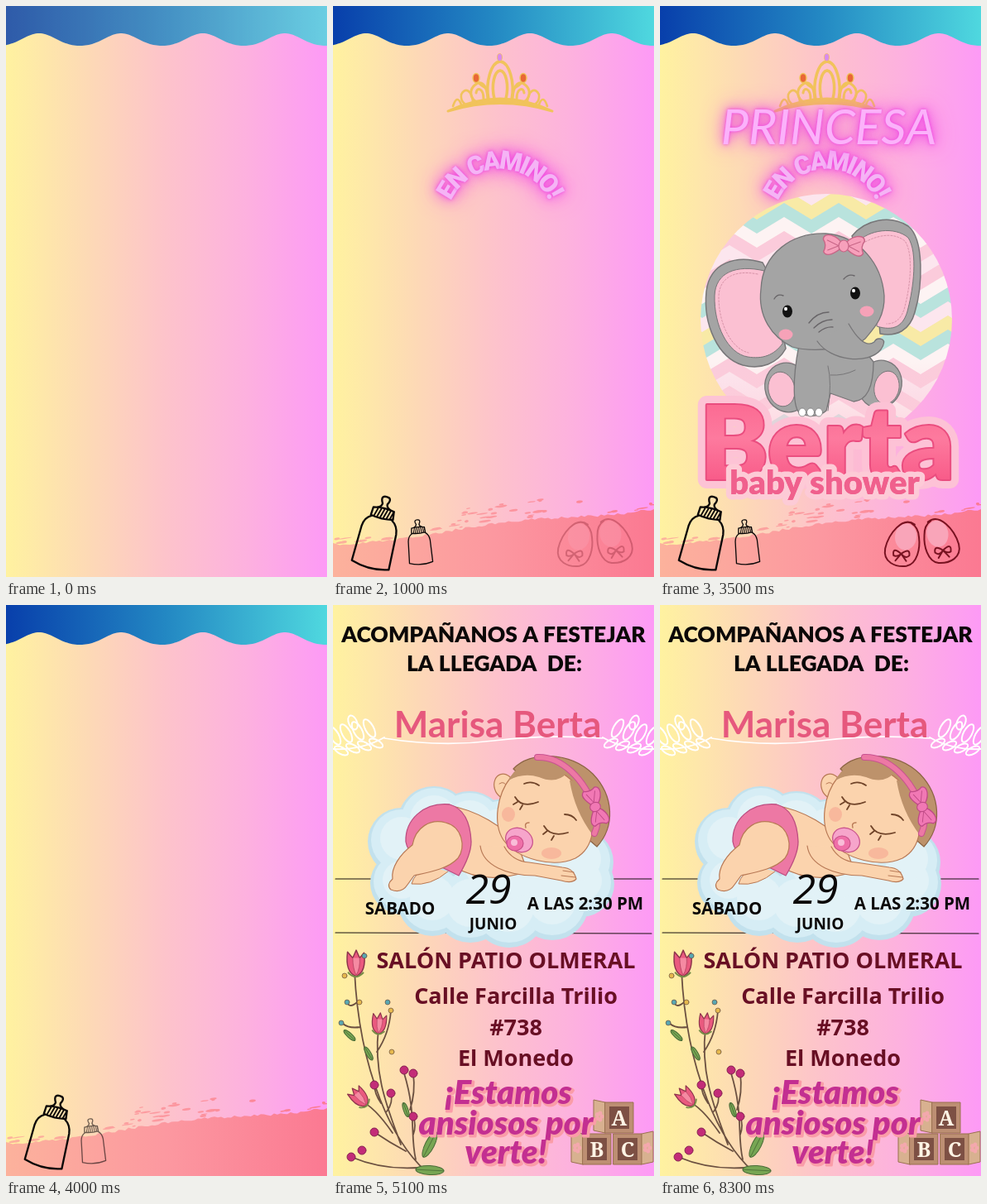
Recreate the animation shown at these times as an HTML page with a canvas. Size 388 by 690 pixels, loop 9.5 s.

```html
<!DOCTYPE html>
<html lang="es">
<head>
<meta charset="utf-8">
<title>Baby shower</title>
<style>
html, body { margin: 0; width: 100%; height: 100%; overflow: hidden; }
canvas { display: block; width: 100vw; height: 100vh; }
</style>
</head>
<body>
<canvas id="stage" width="388" height="690"></canvas>
<script>
const W = 388, H = 690, LOOP = 9500;
const stage = document.getElementById('stage').getContext('2d');
let g;

function layer(draw) {
  const canvas = document.createElement('canvas');
  canvas.width = W;
  canvas.height = H;
  g = canvas.getContext('2d');
  g.lineCap = g.lineJoin = 'round';
  draw();
  return canvas;
}

function paint(path, fill, stroke, width = 1) {
  if (fill) { g.fillStyle = fill; g.fill(path); }
  if (stroke) { g.strokeStyle = stroke; g.lineWidth = width; g.stroke(path); }
}

const shape = (d, fill, stroke, width) => paint(new Path2D(d), fill, stroke, width);

function oval(x, y, rx, ry, fill, stroke, width, turn = 0) {
  const p = new Path2D();
  p.ellipse(x, y, rx, ry, turn, 0, 7);
  paint(p, fill, stroke, width);
}

function at(x, y, turn, sx, sy, draw) {
  g.save();
  g.translate(x, y);
  g.rotate(turn);
  g.scale(sx, sy);
  draw();
  g.restore();
}

function text(str, x, y, font, fill) {
  g.font = font;
  g.textAlign = 'center';
  g.fillStyle = fill;
  g.fillText(str, x, y);
}

function outlined(str, x, y, font, fill, edge, width) {
  g.font = font;
  g.textAlign = 'center';
  g.strokeStyle = edge;
  g.lineWidth = width;
  g.strokeText(str, x, y);
  text(str, x, y, font, fill);
}

function gradient(x0, y0, x1, y1, ...colors) {
  const grad = g.createLinearGradient(x0, y0, x1, y1);
  colors.forEach((c, i) => grad.addColorStop(i / (colors.length - 1), c));
  return grad;
}

function random(seed) {
  return () => (seed = (seed * 16807) % 2147483647) / 2147483647;
}

function neon(draw) {
  g.shadowColor = '#ee45e0';
  for (const blur of [28, 14, 4]) {
    g.shadowBlur = blur;
    draw();
  }
  g.shadowBlur = 0;
}

// ---- First page ----

function backdrop() {
  g.fillStyle = gradient(0, 0, W, 0, '#fff2a0', '#fddab5', '#fdc3cb', '#fdb1df', '#fd9af6');
  g.fillRect(0, 0, W, H);
}

function wave() {
  const p = new Path2D('M0 0');
  for (let x = 0; x <= W; x += 2) {
    const a = (x - 40) / 99 * 2 * Math.PI;
    p.lineTo(x, 41.2 - 7.5 * Math.cos(a) - 0.7 * Math.cos(2 * a));
  }
  p.lineTo(W, 0);
  paint(p, gradient(0, 0, W, 0, '#083fab', '#2388c3', '#4fd8df'));
}

function brush() {
  const rnd = random(41);
  const edge = x => 649 - x * 0.115 + 3 * Math.sin(x / 45);
  const color = gradient(0, 0, W, 0, '#fcb29c', '#fc98a0', '#fb7992');
  const p = new Path2D('M0 690');
  for (let x = 0; x <= W; x += 4) p.lineTo(x, edge(x) + rnd() * 3);
  p.lineTo(W, H);
  paint(p, color);
  for (let i = 0; i < 46; i++) {
    const x = i < 20 ? 150 + rnd() * 110 : rnd() * W;
    const lift = rnd() * (x > 150 && x < 300 ? 22 : 6);
    oval(x, edge(x) - lift, 2 + rnd() * 6, 0.6 + rnd(), color, null, 0, -0.15);
  }
}

function bottle(x, y, turn, size, line) {
  at(x, y, turn, size, size, () => {
    shape('M-13 -62Q-21 -58 -22 -47L-24 -3Q0 5 23 -2L22 -46Q21 -57 13 -62', null, '#0b0808', line);
    shape('M-13 -73Q0 -76 13 -73L14 -63Q0 -60 -14 -63Z', null, '#0b0808', line);
    for (let i = -10; i < 12; i += 4) shape(`M${i} -63L${i + 3} -73`, null, '#0b0808', line * 0.8);
    shape('M-8 -74Q-3 -76 -3 -80Q-8 -89 0 -89Q8 -89 3 -80Q3 -76 8 -74', null, '#0b0808', line);
  });
}

function shoe(x, y, turn, flip) {
  at(x, y, turn, flip, 1, () => {
    oval(3, -9, 13, 16, '#f9a5b9');
    shape('M12 -25C-4 -34 -18 -10 -20 8C-21 25 -5 29 8 26C21 22 22 2 19 -10Q17 -22 8 -26', null, '#781221', 2);
    shape('M0 12Q-12 4 -9 15Q-5 17 0 12Q10 3 10 13Q6 18 0 12L-6 21M0 12L7 20', null, '#781221', 2);
  });
}

function tiara() {
  const gold = '#f1c35b';
  shape('M139 127Q202 97 265 127Q202 108 139 127Z', gold, gold, 3);
  shape('M188 113C184 92 191 68 202 67C213 68 220 92 216 113M195 112C191 95 195 79 202 78C209 79 213 95 209 112', null, gold, 3.5);
  for (const side of [1, -1]) {
    at(202, 0, 0, side, 1, () => {
      shape('M15 112C16 93 24 90 30 95C38 101 36 111 30 115M20 112C20 100 28 97 29 105', null, gold, 3);
      shape('M33 116C34 101 43 98 47 107Q48 114 43 118M47 119Q52 106 57 121M16 100Q24 96 28 91', null, gold, 2.6);
    });
  }
  for (const x of [173, 230]) oval(x, 87, 4, 5.5, '#e96736', gold, 1.5);
  oval(201.5, 62, 3, 4.5, '#d98bed', gold, 0.8);
}

function arcWord() {
  const word = 'EN CAMINO!', radius = 78;
  g.font = '900 31px Roboto, sans-serif';
  const width = g.measureText(word).width;
  neon(() => {
    let along = -width / 2;
    for (const letter of word) {
      const w = g.measureText(letter).width;
      at(202, 262, (along + w / 2) / radius, 1, 1, () => text(letter, 0, -65, g.font, '#f5b4f5'));
      along += w;
    }
  });
}

function princess() {
  neon(() => text('PRINCESA', 204, 167, 'italic 59px Lato, sans-serif', '#fbb2fa'));
}

function chevrons() {
  const white = '#fdf3f3', pale = '#fce6ee', pink = '#fbcbdb', mint = '#b9e3dd';
  const colors = ['#f8eaa6', mint, white, pink, pale, pink, white, mint, pale];
  g.save();
  g.beginPath();
  g.arc(201, 379, 152, 0, 7);
  g.clip();
  for (let row = -2; row < 20; row++) {
    const y = 221 + row * 17, p = new Path2D();
    const zigzag = i => y + (i % 2 ? 20 : 0);
    for (let i = 0; i <= 11; i++) p.lineTo(18 + i * 33, zigzag(i));
    for (let i = 11; i >= 0; i--) p.lineTo(18 + i * 33, zigzag(i) + 17.5);
    paint(p, colors[(row + 9) % 9]);
  }
  g.fillStyle = gradient(0, 430, 0, 530, '#fdd0db00', '#fdc9d9cc');
  g.fillRect(40, 430, 320, 110);
  g.restore();
}

function bow(x, y, turn, size, fill, edge) {
  at(x, y, turn, size, size, () => {
    shape('M0 0C-8 -14 -25 -16 -25 -7Q-20 0 -24 8C-20 16 -8 8 0 0C8 -14 25 -16 25 -7Q20 0 24 8C20 16 8 8 0 0Z', fill, edge, 1.4);
    shape('M-20 -6L-6 0L-19 6M20 -6L6 0L19 6', null, edge, 1);
    oval(0, 0, 6, 7, fill, edge, 1.2);
  });
}

function elephant() {
  const gray = '#a4a4a4', edge = '#777678', pink = '#fbc0d2';
  chevrons();
  shape('M124 310C92 300 60 310 56 345C52 385 70 425 100 434C122 440 142 432 152 414L135 330Z', gray, edge, 1.5);
  shape('M126 320C92 312 67 322 66 350C65 386 82 420 106 424C124 427 138 422 148 408Z', pink, edge);
  shape('M232 278C248 258 278 252 300 266C320 282 317 340 308 370C302 392 286 400 266 396L262 350Z', gray, edge, 1.5);
  shape('M238 286C252 270 284 266 300 280C312 298 306 342 300 365C295 388 282 393 262 387L262 340Z', pink, edge);
  g.setLineDash([2, 2]);
  shape('M118 324C88 318 71 330 71 352C71 384 86 414 107 419M248 285Q278 270 296 284C307 300 302 340 296 363Q291 384 274 384', null, '#d692a7', 1);
  g.setLineDash([]);
  oval(154, 461, 27, 30, gray, edge, 1.3, -0.3);
  oval(147, 463, 16, 21, pink, edge, 1, -0.2);
  oval(266, 457, 26, 29, gray, edge, 1.3, 0.3);
  oval(274, 461, 15, 20, pink, edge, 1, 0.2);
  shape('M168 410C160 450 160 487 170 493Q190 499 201 489L206 468L234 478Q258 476 258 430L242 410Z', gray, edge, 1.3);
  shape('M203 435Q208 455 203 489M206 446Q222 447 236 440', null, edge);
  for (const x of [172, 182, 192]) oval(x, 491, 4.5, 5, '#fff', edge, 0.8);
  shape('M122 342C124 298 160 274 200 275C242 278 268 312 271 350C272 376 259 389 248 402C232 416 180 418 160 412C135 400 118 375 122 342Z', gray, edge, 1.3);
  shape('M190 405C206 429 252 434 267 415Q273 406 269 403Q262 400 259 406C248 414 236 398 228 384', gray, edge, 1.3);
  shape('M180 383Q190 370 204 370M186 389Q196 379 208 379M192 394Q201 387 209 388M138 354Q142 347 149 350M222 330Q228 323 235 326', null, '#686568', 1.4);
  for (const [x, y] of [[154, 369], [236, 347]]) {
    oval(x, y, 6, 7.5, '#111');
    oval(x - 2, y - 3, 2, 2.3, '#fff');
  }
  for (const [x, y] of [[152, 397], [250, 369]]) oval(x, y, 8.5, 6.5, '#f6a2b8');
  bow(222, 290, 0.05, 1, '#f7a0bb', '#c76586');
}

function title() {
  const font = '900 124px Lato, sans-serif', small = '900 40px Lato, sans-serif';
  outlined('Berta', 202, 572, font, '#f56d94', '#fdc3d6', 22);
  outlined('Berta', 202, 572, font, gradient(0, 470, 0, 575, '#fb6790', '#fd7a9e', '#f85a88'), '#ea4d7f', 4);
  outlined('baby shower', 199, 590, small, '#f0608d', '#fdcbd7', 13);
  text('baby shower', 199, 590, small, '#f0608d');
}

// ---- Second page ----

const ink = '#0b0808', wine = '#680f24';

function heading() {
  const font = '900 26.5px Lato, sans-serif';
  text('ACOMPAÑANOS A FESTEJAR', 194, 45, font, ink);
  text('LA LLEGADA  DE:', 195, 80, font, ink);
}

function laurels() {
  for (const side of [1, -1]) {
    at(side > 0 ? 0 : W, 0, 0, side, 1, () => {
      shape('M-2 174Q34 176 62 160', null, '#fff', 2);
      for (let i = 0; i < 4; i++) {
        const x = 2 + i * 14, y = 172 - i * 3;
        oval(x, y - 14, 5, 12, null, '#fff', 2, -0.5);
        oval(x + 8, y + 4, 4, 9, null, '#fff', 2, -1.1);
      }
      oval(24, 142, 5, 9, null, '#fff', 2, -0.4);
    });
  }
  shape('M62 161Q130 172 194 164T326 161', null, '#fff', 1.6);
}

function babyName() {
  text('Marisa Berta', 199, 160, '700 44px Lato, sans-serif', '#e6587d');
}

function rules() {
  shape('M3 331H385M3 396L385 397', null, '#17110f', 1.2);
}

function cloud() {
  const puffs = [[83, 286, 41], [122, 263, 44], [165, 270, 45], [83, 336, 38], [120, 358, 42],
    [166, 364, 44], [213, 369, 45], [265, 361, 44], [300, 337, 40], [298, 311, 41], [210, 304, 70]];
  const draw = (shrink, color, dy) => puffs.forEach(([x, y, r]) => oval(x, y + dy, r - shrink, r - shrink, color));
  draw(0, '#c2e1ed', 0);
  draw(4, '#d6edf5', -2);
  draw(15, '#e2f2f7', -4);
}

function baby() {
  const skin = '#fbd3ad', edge = '#b87955', pink = '#ed78a4', hair = '#bd926b';
  cloud();
  shape('M116 316Q98 324 95 337Q118 340 139 322', skin, edge);
  shape('M139 242C174 248 206 267 224 291L235 322C202 333 172 332 146 316Z', skin, edge, 1.2);
  shape('M141 241C109 238 87 260 88 286Q90 297 97 300L152 327Q167 302 167 286C166 262 158 246 141 241Z', pink, '#bc4d80', 1.3);
  shape('M96 290C100 268 118 258 136 263C156 268 161 292 151 306C139 319 116 323 98 327L90 338Q83 349 70 344Q64 338 72 331C70 318 80 302 96 290Z', skin, edge, 1.2);
  oval(207, 219, 12, 15, skin, edge, 1.2, -0.3);
  shape('M201 216Q208 211 211 222', null, edge);
  shape('M218 198C238 176 286 177 314 204C340 231 341 268 319 292L282 260Z', hair, '#8b6444', 1.2);
  shape('M215 208C232 182 280 191 305 232C321 263 315 294 293 306C267 318 224 308 206 284C193 264 198 229 215 208Z', skin, edge, 1.2);
  shape('M212 212C226 184 259 184 283 203Q270 217 249 208Q230 202 212 212ZM286 212Q292 249 314 278Q325 239 302 213Z', hair);
  shape('M247 184C276 183 304 209 318 250Q322 263 316 276', null, '#c85291', 8);
  shape('M247 184C276 183 304 209 318 250Q322 263 316 276', null, pink, 6);
  bow(317, 244, 1.25, 0.92, '#f178b4', '#bf4a86');
  shape('M220 232Q228 246 248 238M255 267Q263 281 284 275M223 238L218 241M229 242L226 247M259 273L254 277M267 279L264 284M231 216Q240 212 249 218M280 253Q289 253 294 260', null, '#704429', 1.8);
  oval(212, 253, 8, 9, '#f8b89c');
  oval(264, 300, 12, 7, '#f8b89c');
  shape('M237 263Q231 263 233 269', null, edge, 1.4);
  oval(225, 284, 17, 14, '#f6a5cb', '#cb578d', 1.3, 0.5);
  oval(220, 288, 10, 9, '#ef6fa8', '#c94f88', 1.2);
  oval(219, 287, 4, 4, '#f9bdd8');
  shape('M178 291C181 315 211 327 244 327L276 333Q289 337 294 331Q291 318 277 317L237 311C220 310 212 301 207 292', skin, edge, 1.2);
  shape('M278 321L291 323M276 327L293 329', null, edge, 1);
}

function date() {
  const bold = size => `700 ${size}px "Open Sans", sans-serif`;
  text('29', 188, 361, 'italic 400 50px "Open Sans", sans-serif', ink);
  text('SÁBADO', 81, 374, bold(20.5), ink);
  text('JUNIO', 193.5, 392, bold(19), ink);
  text('A LAS 2:30 PM', 305, 368, bold(20.5), ink);
}

function address() {
  const font = '700 27px "Open Sans", sans-serif';
  text('SALÓN PATIO OLMERAL', 209, 439, font, wine);
  text('Calle Farcilla Trilio', 221, 482, font, wine);
  text('#738', 221, 520, font, wine);
  text('El Monedo', 221, 557, font, wine);
}

function flowers() {
  const stem = '#6b5040', berry = '#c32c78';
  shape('M112 684C74 650 32 568 26 442M82 652C69 615 48 570 55 511M100 670C93 640 101 615 86 566M72 638Q50 606 33 599M103 680Q60 683 22 667M88 660Q69 650 50 637M97 640Q101 629 97 618M33 510Q19 512 12 506M29 480Q20 488 17 480M53 540Q68 518 70 490M65 612Q73 601 70 590M93 610Q100 589 97 566M58 602Q50 590 50 580', null, stem, 1.8);
  for (const [x, y, size, turn] of [[27, 436, 1.05, 0], [55, 508, 0.85, 0.1], [33, 597, 0.9, -0.7]]) {
    at(x, y, turn, size, size, () => {
      shape('M-9 -16L-3 -9L1 -18L5 -9L10 -15Q13 7 1 12Q-12 8 -9 -16Z', '#ea5a7f', '#8d344c', 1.4);
      shape('M-3 -9Q-3 3 1 11Q6 2 5 -9', '#f58aa2', '#b64361', 0.8);
      shape('M-8 8Q0 17 9 8', null, '#758b47', 2);
    });
  }
  for (const [x, y] of [[86, 562], [97, 566], [50, 580], [70, 590], [50, 637], [97, 618], [22, 667], [35, 659]]) {
    oval(x, y, 5, 5, berry, '#84214f', 1);
  }
  [[38, 424], [32, 480], [10, 505], [70, 490], [17, 480], [14, 448], [66, 480], [71, 540]].forEach(([x, y], i) => {
    oval(x, y, 3, 3, i % 2 ? '#e6b94d' : '#58a7b2', stem, 0.7);
  });
  for (const [x, y, turn] of [[117, 652, -1.1], [117, 683, 0.05], [88, 610, -1.9], [43, 542, -2.1], [20, 520, -2.4]]) {
    at(x, y, turn, 1, 1, () => {
      const size = x > 100 ? 17 : 9;
      oval(0, 0, size, size * 0.32, '#77a653', '#496b37', 1);
      shape(`M${-size} 0H${size}`, null, '#496b37', 0.8);
    });
  }
}

function closing() {
  const font = 'italic 900 40px Lato, sans-serif';
  [['¡Estamos', 212, 603], ['ansiosos por', 209, 640], ['verte!', 209, 675]].forEach(([line, x, y]) => {
    outlined(line, x + 2, y + 2, font, '#fa9da8', '#fa9da8', 3);
    text(line, x, y, font, '#c32f91');
  });
}

// The side face lies left (-1) or right (1) of the front.
function block(letter, x, y, side) {
  at(x, y, 0, 1, 1, () => {
    const near = side * 17, far = side * 31, edge = '#99704f';
    shape(`M${near} -18L${far} -21V16L${near} 19Z`, '#d8b190', edge);
    shape('M-17 -18H17V19H-17Z', '#bd8f73', edge);
    shape('M-12 -13H12V14H-12Z', '#7d5044');
    for (let i = 0; i < 5; i++) {
      oval(side * 24 + 3 * Math.cos(i * 1.257), 4 * Math.sin(i * 1.257) - 1, 2.4, 2.6, '#f4a8ad');
    }
    text(letter, 0, 10, '700 25px "Noto Serif", serif', '#fff4e5');
  });
}

function blocks() {
  block('B', 319, 657, -1);
  block('C', 356, 657, 1);
  block('A', 346, 619, -1);
}

const background = layer(backdrop);

// Each entry: picture, fade-in start, fade-out start.
const firstPage = [
  [wave, -210, 4200], [brush, 220, 4110],
  [() => bottle(45, 678, 0.23, 0.98, 2.4), 340, 4020],
  [() => bottle(107, 674, -0.1, 0.6, 2.2), 460, 3920],
  [tiara, 580, 3800], [arcWord, 700, 3750],
  [() => { shoe(293, 650, 0.12, 1); shoe(340, 646, -0.18, -1); }, 925, 3700],
  [princess, 1060, 3640], [elephant, 1200, 3570], [title, 1400, 3500]
].map(([draw, start, end]) => [layer(draw), start, end]);

const secondPage = [heading, laurels, babyName, rules, baby, date, address, flowers, blocks, closing]
  .map((draw, i) => [layer(draw), 4400 + i * 50, Infinity]);

const clamp = v => Math.max(0, Math.min(1, v));

function render(now) {
  const t = now % LOOP;
  stage.globalAlpha = 1;
  stage.drawImage(background, 0, 0);
  for (const [picture, start, end] of t < 4400 ? firstPage : secondPage) {
    const alpha = clamp((t - start) / 250) * (1 - clamp((t - end) / 200));
    if (alpha <= 0) continue;
    stage.globalAlpha = alpha;
    stage.drawImage(picture, 0, 0);
  }
}

const begin = performance.now();
function tick() {
  render(performance.now() - begin);
  requestAnimationFrame(tick);
}
tick();
</script>
</body>
</html>
```
